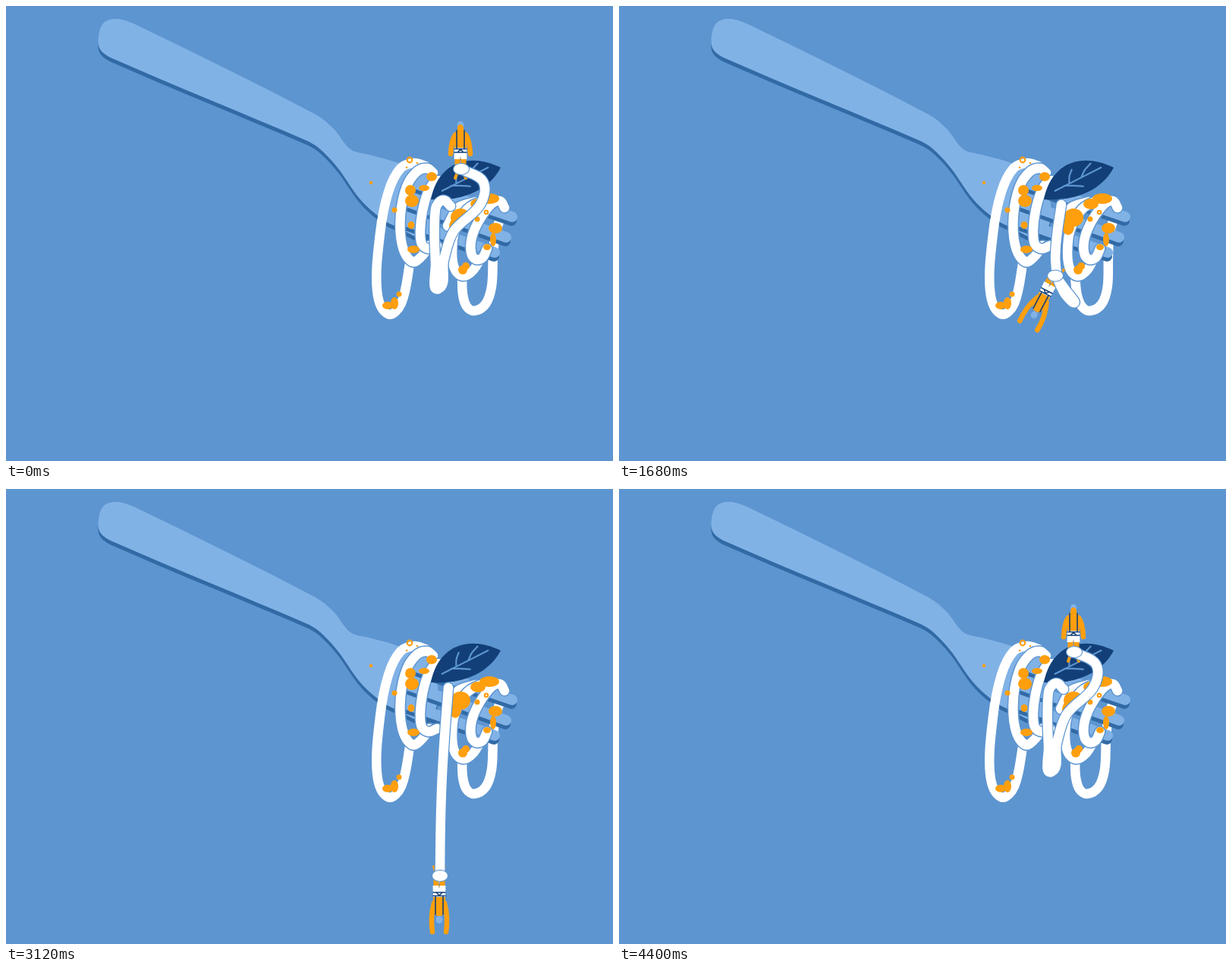
Write an HTML page with a canvas that moves like this. It is 800 by 600 pixels and loops after 4800 ms.

```html
<!DOCTYPE html>
<html lang="en">
<head>
<meta charset="utf-8">
<title>Spaghetti jump</title>
<style>
html, body { margin: 0; width: 100%; height: 100%; overflow: hidden; background: #5d95d0; }
canvas { display: block; }
</style>
</head>
<body>
<canvas id="stage" width="800" height="600"></canvas>
<script>
const ctx = document.getElementById('stage').getContext('2d');
const LOOP = 4800, STEP = 80;
const SKY = '#5d95d0', LIGHT = '#81b2e6', SHADE = '#316aa5',
      NAVY = '#123f77', ORANGE = '#ff9f0e', WHITE = '#fff';

const nums = s => s.match(/-?[\d.]+/g).map(Number);
const lerp = (a, b, f) => a + (b - a) * f;
const mix = (a, b, f) => a.map((v, i) => lerp(v, b[i], f));
const mapPoints = (v, fn) => {
  const out = [];
  for (let i = 0; i < v.length; i += 2) out.push(...fn(v[i], v[i + 1], i / (v.length - 2)));
  return out;
};

// Eased value of a track of [ms, values...] rows.
function at(track, t) {
  const i = track.findIndex(row => row[0] > t);
  if (i === 0) return track[0].slice(1);
  if (i < 0) return track[track.length - 1].slice(1);
  const a = track[i - 1], b = track[i];
  const f = (t - a[0]) / (b[0] - a[0]);
  return mix(a, b, .5 - .5 * Math.cos(Math.PI * f)).slice(1);
}

// Fork outline: level, dipped, raised.
const FORK = [
  `122,40 129,22 146,17 172,25 408,143 432,162 454,189 478,196 520,208 560,228
   560,302 510,289 488,275 466,254 436,212 412,187 395,177 140,69 124,57`,
  `122,38 130,24 150,22 174,32 415,156 440,178 470,222 490,239 514,251 555,268
   555,310 510,299 493,287 476,263 447,219 426,194 402,178 150,65 127,52`,
  `119,38 125,20 143,13 166,18 402,142 425,150 460,153 500,147 545,144 600,160
   590,255 530,226 505,206 480,195 455,191 425,186 400,178 140,67 121,55`].map(nums);
const TINES = ['530,231 667,278', '525,257 659,305', '525,283 644,325'].map(nums);

// Everything on the fork is given for the level fork only.
const HANGER = nums('601,355 602,380 607,396 617,402 632,393 640,370 642,330 645,300 657,266');
const COILS = [
  '553,211 538,207 520,214 504,245 493,300 489,375 503,406 521,392 533,335',
  '563,220 555,214 542,218 528,238 520,275 522,315 535,337 548,330 558,316',
  '576,231 566,231 556,246 549,270 546,295 548,314 557,320 568,316',
  '620,258 596,266 582,290',
  '648,256 632,256 608,268 592,295 588,325 592,348 603,356 616,348 627,330',
  '657,266 651,257 640,261 624,282 614,305 613,325 619,334 628,332 634,320'].map(nums);
const LEAF = nums('560,255 568,212 604,190 652,213 640,236 612,258');
const VEINS = ['.19,.07 .87,.12', '.33,.09 .42,.01 .52,-.1', '.41,.11 .47,.24 .55,.35',
               '.58,.1 .68,.22 .8,.3'].map(nums);

// Sauce: x, y, radii.
const BLOBS = [
  [561, 225, 7, 6], [551, 240, 7, 4], [533, 243, 7, 7], [535, 257, 9, 8], [534, 289, 4.5, 5],
  [537, 321, 8, 5], [503, 395, 7, 5], [512, 392, 5, 8], [599, 279, 13, 12], [592, 291, 8, 11],
  [637, 254, 13, 7], [622, 261, 10, 7], [645, 293, 9, 7], [642, 308, 4, 9], [634, 318, 5, 4],
  [606, 343, 5, 5], [602, 348, 6, 6], [518, 380, 3.5, 3.5], [621, 281, 3.5, 3.5],
  [512, 269, 3.5, 3.5], [481, 233, 2.2, 2.2], [542, 207, 1.3, 1.3], [528, 213, 1.3, 1.3]];
const RINGS = [[532, 203, 3.3], [633, 272, 2.2]];

// Time tracks, eased between turning points.
const TILT = [[3600, 0], [3680, -1], [3800, -.9], [4080, 1], [4220, 0]];
const SWING = [[480, 0], [1280, 1], [1840, .4], [2240, 1], [2520, 0]];
const KNOT_X = [[480, 600], [640, 611], [1240, 598], [1680, 575], [2080, 598], [2760, 566],
  [3120, 572], [3600, 573], [3680, 580], [4080, 565], [4360, 600]];
const KNOT_Y = [[480, 215], [1240, 521], [1700, 355], [2400, 516], [2760, 473], [3160, 511],
  [3600, 510], [3680, 481], [4120, 232], [4360, 215]];
const LEAN = [[720, 0], [1760, 28], [2080, -8.5], [2480, 3], [3000, 0], [3840, 0], [4080, 18], [4320, 0]];
const FLIP = [[400, 1], [760, -1], [4000, -1], [4360, 1]];
const REACH = [[400, 0], [640, 1], [1280, 2], [2080, 1], [4100, 1], [4360, 0]];

const knotAt = t => [...at(KNOT_X, t), ...at(KNOT_Y, t)];

// Rope from the fork to the knot: sideways bow, S-wave and downward sag.
function hang(t, bow, wave = 0, sag = 0, from = [583, 262]) {
  const [x, y] = knotAt(t), points = [t];
  for (let i = 0; i < 10; i++) {
    const f = i / 9, arch = Math.sin(Math.PI * f);
    points.push(lerp(from[0], x, f) + bow * arch - wave * Math.sin(2 * Math.PI * f),
                lerp(from[1], y, f) + 4 * sag * f * (1 - f));
  }
  return points;
}
const COILED = nums('586,264 576,256 566,268 566,340 570,373 577,335 590,297 625,262 629,232 600,215');
const LOOPED = nums('584,262 577,285 576,400 585,434 612,446 626,436 612,429 603,424 596,420 598,444');
const TOSSED = nums('574,262 576,280 585,287 595,278 602,255 604,240 598,234 585,235 575,236 565,237');
const ROPE = [
  [400, ...COILED], hang(800, -8, 8, 90), hang(1280, 3, 16), hang(1680, 12, 14, 75),
  [2080, ...LOOPED], hang(2400, -3), hang(2760, -6), hang(3120, -3), hang(3600, -3),
  hang(3680, -5, 0, 0, [572, 285]), hang(3920, 0, 10, 50), [4080, ...TOSSED], [4400, ...COILED]];

// Where a point of the level pasta goes when the fork tips.
function tip(x, y, w) {
  const dx = x - 532, h = y - 203;
  if (w < 0) {
    const roll = 26 * Math.exp(-(((x - 525) / 35) ** 2)) * Math.sin(Math.PI * Math.max(0, Math.min(1, h / 190)));
    return mix([x, y], [531 + .923 * dx - roll, 248 + .084 * dx + .7 * h], -w);
  }
  const drop = h - 8.5e-6 * h ** 3 + .0013 * dx * h - .12 * dx;
  return mix([x, y], [579 + .9 * dx - .1 * h, 167 + drop], w);
}
const tipAll = (v, w) => mapPoints(v, (x, y) => tip(x, y, w));
const sway = (v, amount) => mapPoints(v, (x, y, f) => [x + amount * Math.sin(Math.PI * f), y]);

// Smooth path through flat x,y pairs.
function curve(v, closed) {
  const n = v.length / 2;
  const idx = i => closed ? (i + n) % n : Math.max(0, Math.min(n - 1, i));
  const pt = i => [v[idx(i) * 2], v[idx(i) * 2 + 1]];
  const dir = i => {
    const a = pt(i - 1), b = pt(i + 1), d = Math.hypot(b[0] - a[0], b[1] - a[1]) || 1;
    return [(b[0] - a[0]) / d, (b[1] - a[1]) / d];
  };
  const path = new Path2D();
  path.moveTo(v[0], v[1]);
  for (let i = 0; i < (closed ? n : n - 1); i++) {
    const a = pt(i), b = pt(i + 1), u = dir(i), w = dir(i + 1);
    const h = Math.hypot(b[0] - a[0], b[1] - a[1]) / 3;
    path.bezierCurveTo(a[0] + u[0] * h, a[1] + u[1] * h, b[0] - w[0] * h, b[1] - w[1] * h, ...b);
  }
  if (closed) path.closePath();
  return path;
}

function stroke(path, color, width) {
  ctx.strokeStyle = color;
  ctx.lineWidth = width;
  ctx.stroke(path);
}
function fill(path, color) {
  ctx.fillStyle = color;
  ctx.fill(path);
}
function oval(x, y, rx, ry = rx) {
  const path = new Path2D();
  path.ellipse(x, y, rx, ry, 0, 0, Math.PI * 2);
  return path;
}
function noodle(points, edge) {
  const path = curve(points);
  if (edge) stroke(path, SKY, 12.5 + edge);
  stroke(path, WHITE, 12.5);
}
function shifted(dx, dy, draw) {
  ctx.save();
  ctx.translate(dx, dy);
  draw();
  ctx.restore();
}

function drawFork(w) {
  const raised = Math.max(0, w);
  const handle = curve(mix(FORK[0], FORK[w < 0 ? 1 : 2], Math.abs(w)), true);
  const tines = TINES.map(t => curve(tipAll(t, w)));
  const width = 14 + 2 * Math.min(0, w);
  shifted(2 * raised, lerp(5.5, -4, raised), () => fill(handle, SHADE));
  fill(handle, LIGHT);
  shifted(lerp(-1, 2, raised), lerp(5, -5, raised), () => tines.forEach(t => stroke(t, SHADE, width)));
  tines.forEach(t => stroke(t, LIGHT, width));
}

function drawSauce(w, swing) {
  const squash = 1 + .2 * Math.min(0, w);
  for (const [x, y, rx, ry] of BLOBS) {
    const [px, py] = tip(x, y, w);
    const loose = x > 600 && y > 340 ? 6 * swing : 0;
    fill(oval(px + loose, py, rx, ry * squash), ORANGE);
  }
  for (const [x, y, r] of RINGS) stroke(oval(...tip(x, y, w), r), ORANGE, 2.2);
}

// The leaf dips with the pasta and swivels on its stem when tossed.
function leafPoint(x, y, w) {
  if (w < 0) return tip(x, y, w);
  const angle = -.56 * w, c = Math.cos(angle), s = Math.sin(angle);
  const dx = x - LEAF[0], dy = y - LEAF[1];
  return [LEAF[0] - 11 * w + dx * c - dy * s, LEAF[1] + 17 * w + dx * s + dy * c];
}
function drawLeaf(w) {
  const [bx, by, ax, ay, cx, cy, tx, ty, dx, dy, ex, ey] = mapPoints(LEAF, (x, y) => leafPoint(x, y, w));
  const path = new Path2D();
  path.moveTo(bx, by);
  path.bezierCurveTo(ax, ay, cx, cy, tx, ty);
  path.bezierCurveTo(dx, dy, ex, ey, bx, by);
  fill(path, NAVY);
  const vx = (ax + cx - dx - ex) / 2, vy = (ay + cy - dy - ey) / 2;
  for (const vein of VEINS) {
    const points = mapPoints(vein, (u, v) =>
      [bx + u * (tx - bx) + v * vx, by + u * (ty - by) + v * vy]);
    stroke(curve(points), SKY, 2.2);
  }
}

function drawMan(x, y, flip, lean, reach) {
  const up = Math.min(reach, 1), spread = Math.max(0, reach - 1) * 8;
  ctx.save();
  ctx.translate(x - 1, y);
  ctx.rotate(lean * Math.PI / 180);
  ctx.scale(1, flip);
  fill(oval(0, -58, 4.3, 5), LIGHT);
  if (flip > 0) fill(oval(0, -53.5, 4, 5.5), ORANGE);
  for (const s of [-1, 1]) {
    stroke(new Path2D(`M${4 * s},4 L${7 * s},12`), ORANGE, 4);
    stroke(new Path2D(`M${4 * s},-16 V2`), ORANGE, 7);
    const sy = lerp(-45, -36, up), cx = (12 + spread * .7) * s, cy = lerp(-38, -54, up);
    const hx = (lerp(13, 9, up) + spread) * s, hy = lerp(-20, -74, up);
    stroke(new Path2D(`M${7 * s},${sy} Q${cx},${cy} ${hx},${hy}`), ORANGE, 6.5);
  }
  fill(new Path2D('M-3,-53 Q-8,-50 -8,-42 L-8,-26 H8 L8,-42 Q8,-50 3,-53Z'), ORANGE);
  fill(new Path2D('M-8,-28 H8 L8.5,-13 H1 L0,-17 L-1,-13 H-8.5Z'), WHITE);
  fill(oval(0, -7, 1.6), WHITE);
  for (const s of [-1, 1]) stroke(new Path2D(`M${5 * s},-27 V-51`), NAVY, 1.6);
  stroke(new Path2D('M-8,-26.5 H8 M-8,-22 H8 M-4,-22 L0,-26 L4,-22'), NAVY, 1.5);
  ctx.restore();
}

function drawRope(t, kx, ky) {
  const rope = at(ROPE, t);
  const [ex, ey] = [kx - rope[18], ky - rope[19]];
  noodle(mapPoints(rope, (x, y, f) => [x + ex * f * f, y + ey * f * f]), 2.5);
  const knot = oval(kx, ky, 10, 7);
  stroke(knot, SKY, 2);
  fill(knot, WHITE);
}

function draw(t) {
  const [w] = at(TILT, t), [swing] = at(SWING, t), [kx, ky] = knotAt(t);
  ctx.lineCap = ctx.lineJoin = 'round';
  ctx.fillStyle = SKY;
  ctx.fillRect(0, 0, 800, 600);
  noodle(sway(tipAll(HANGER, w), swing * 8));
  drawFork(w);
  COILS.forEach((coil, i) => noodle(sway(tipAll(coil, w), i === 4 ? swing * 6 : 0), i ? 3 : 0));
  drawSauce(w, swing);
  drawLeaf(w);
  drawMan(kx, ky, ...at(FLIP, t), ...at(LEAN, t), ...at(REACH, t));
  drawRope(t, kx, ky);
}

const start = performance.now();
function tick() {
  const t = (performance.now() - start) % LOOP;
  draw(Math.floor(t / STEP) * STEP);
  requestAnimationFrame(tick);
}
tick();
</script>
</body>
</html>
```
